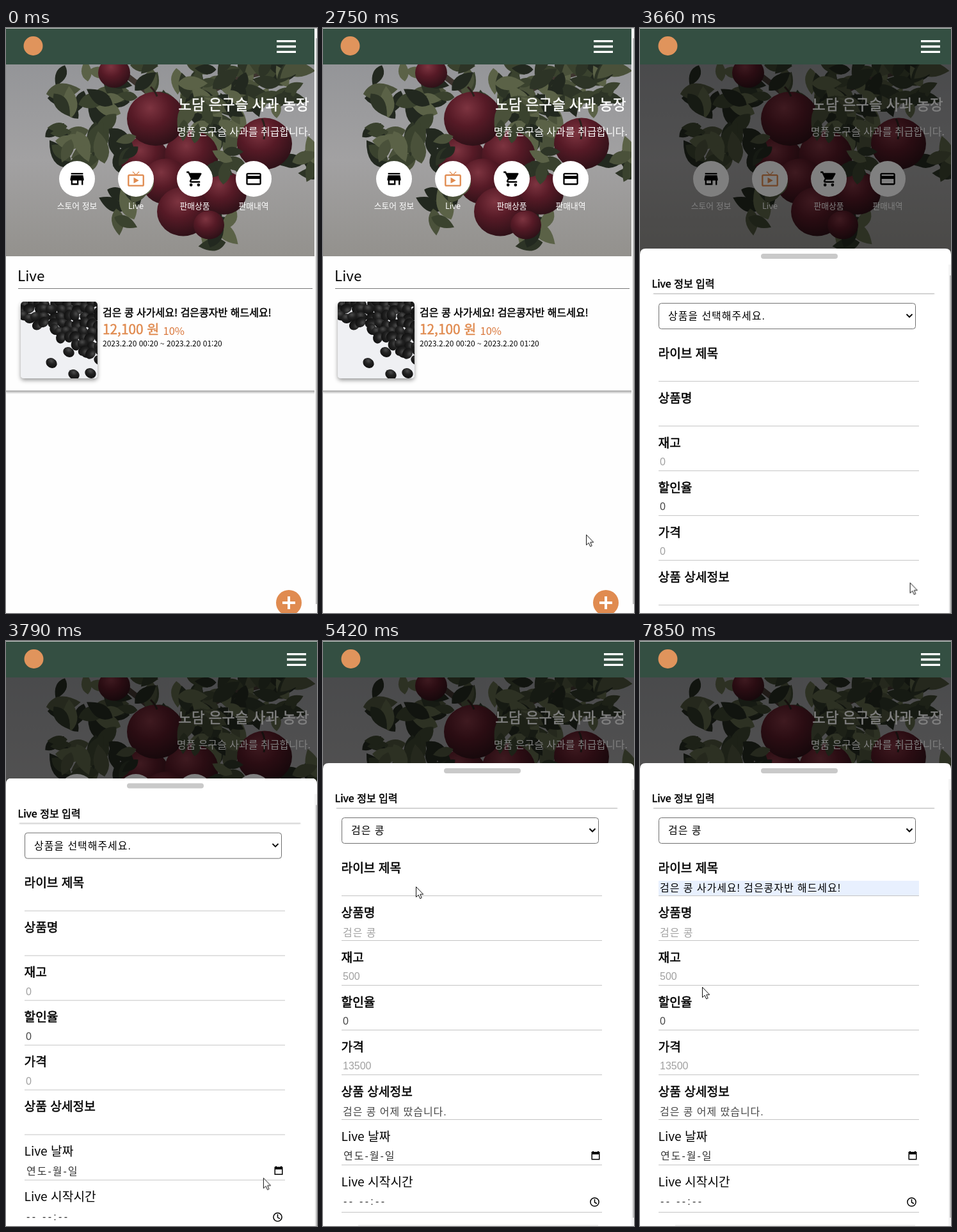
These frames come from a looping animation (486x915 px, 8000 ms). An HTML page:

```html
<!DOCTYPE html>
<html lang="ko">
<head>
<meta charset="utf-8">
<title>Live</title>
<style>
html, body { margin: 0; width: 100%; height: 100%; overflow: hidden; background: #fefefe; }
svg { display: block; width: 100vw; height: 100vh; }
text { font-family: "Noto Sans CJK KR", "Noto Sans KR", "Noto Sans", sans-serif; white-space: pre; }
.input { font: 16px "Liberation Sans", "Noto Sans CJK KR", sans-serif; letter-spacing: .95px; }
.num { font: 16px "Liberation Sans", sans-serif; }
.thin { font-weight: 300; fill: #333; }
/* a medium weight between regular and bold */
.medium { fill: currentColor; stroke: currentColor; stroke-width: .55px; stroke-linejoin: round; }
.label { font-size: 19.2px; }
.nav { font-size: 12.8px; fill: #fff; text-anchor: middle; }
.hint { fill: #a0a0a0; }

.anim { animation: 8s linear infinite; }
.step { animation: 8s step-end infinite; }
#scroll { animation-name: early; }
#menu { animation-name: menu; }
#logo { animation-name: logo; }
#fab { animation-name: fab; }
#dim { animation-name: dim; }
#sheet { animation-name: sheet; }
#cursor { animation-name: move; }
#arrow { animation-name: arrow; }
#list { animation-name: list; }
#popup { animation-name: popup; }
#preview { animation-name: preview; }
#tint { animation-name: tint; }
#title { animation-name: title; }
#focus { animation-name: focus; transform-origin: 233px 398px; }
.empty { animation-name: empty; }
.filled { animation-name: filled; }

@keyframes early { 0% { visibility: visible } 43.125%, 100% { visibility: hidden } }
@keyframes menu { 0% { transform: none } 43.125%, 100% { transform: translateX(16px) } }
@keyframes logo { 0% { transform: none } 43.125%, 100% { transform: translateX(1px) } }
@keyframes fab {
  0% { transform: translate(442px, 899px) }
  43.125%, 100% { transform: translate(459px, 916px) rotate(45deg) }
}
@keyframes dim { 0%, 43.125% { opacity: 0 } 44.25%, 100% { opacity: .5 } }
@keyframes sheet {
  0%, 44.375% { transform: translateY(726px); animation-timing-function: cubic-bezier(.16, 1, .3, 1) }
  50.625%, 100% { transform: none }
}
@keyframes arrow { 0% { visibility: hidden } 17.375%, 100% { visibility: visible } }
@keyframes list { 0% { visibility: hidden } 54.25% { visibility: visible } 63.5%, 100% { visibility: hidden } }
@keyframes empty { 0% { visibility: visible } 63.5%, 100% { visibility: hidden } }
@keyframes filled { 0% { visibility: hidden } 63.5%, 100% { visibility: visible } }
@keyframes popup { 0% { visibility: hidden } 71.25% { visibility: visible } 83.625%, 100% { visibility: hidden } }
@keyframes preview { 0% { visibility: hidden } 75% { visibility: visible } 83.625%, 100% { visibility: hidden } }
@keyframes tint { 0% { visibility: hidden } 75%, 100% { visibility: visible } }
@keyframes title { 0% { visibility: hidden } 83.625%, 100% { visibility: visible } }
@keyframes focus {
  0%, 71.25% { transform: scaleX(0) }
  75%, 86% { transform: none }
  89%, 100% { transform: scaleX(0) }
}
@keyframes move {
  0%, 20.75% { transform: translate(301px, 781px) }
  29.25%, 32.625% { transform: translate(153px, 438px) }
  33.5% { transform: translate(250px, 540px) }
  34.375% { transform: translate(411px, 792px) }
  42.375%, 44% { transform: translate(443px, 896px) }
  47.375% { transform: translate(402px, 841px) }
  51.75%, 54.25% { transform: translate(340px, 300px) }
  57.5% { transform: translate(127px, 348px) }
  59.375% { transform: translate(121px, 346px) }
  61.125%, 63.5% { transform: translate(121px, 360px) }
  67.75%, 71.25% { transform: translate(145px, 384px) }
  77% { transform: translate(215px, 415px) }
  77.875% { transform: translate(213px, 409px) }
  81.125%, 83.625% { transform: translate(205px, 405px) }
  93% { transform: translate(150px, 483px) }
  95.625% { transform: translate(118px, 562px) }
  97.375% { transform: translate(110px, 558px) }
  98.125%, 100% { transform: translate(97px, 541px) }
}
</style>
</head>
<body>
<svg viewBox="0 0 486 915" preserveAspectRatio="none">
  <defs>
    <linearGradient id="sky" x2="0" y2="1">
      <stop stop-color="#949598"/><stop offset=".5" stop-color="#a2a1a2"/><stop offset="1" stop-color="#93918d"/>
    </linearGradient>
    <radialGradient id="apple" cx=".4" cy=".3" r=".75">
      <stop stop-color="#7d3440"/><stop offset=".45" stop-color="#561a26"/><stop offset="1" stop-color="#2a1016"/>
    </radialGradient>
    <radialGradient id="bean" cx=".4" cy=".3" r=".8">
      <stop stop-color="#4c4c4c"/><stop offset=".4" stop-color="#222"/><stop offset="1" stop-color="#0c0c0c"/>
    </radialGradient>
    <clipPath id="heroClip"><path d="M0 57H486V357H0Z"/></clipPath>
    <clipPath id="thumbClip"><rect x="23" y="428" width="120" height="120" rx="5"/></clipPath>
    <filter id="soft" x="-20%" y="-20%" width="140%" height="160%"><feDropShadow dx="0" dy="3" stdDeviation="3" flood-opacity=".4"/></filter>
    <filter id="wide" x="-20%" y="-50%" width="140%" height="260%"><feDropShadow dx="0" dy="9" stdDeviation="11" flood-opacity=".28"/></filter>
    <filter id="small" x="-10%" y="-30%" width="120%" height="180%"><feDropShadow dx="0" dy="1" stdDeviation="1.5" flood-opacity=".35"/></filter>
    <filter id="line" filterUnits="userSpaceOnUse" x="0" y="560" width="486" height="20"><feDropShadow dx="0" dy="1" stdDeviation="1.5" flood-opacity=".4"/></filter>
  </defs>

  <path fill="#fefefe" d="M0 0H486V915H0Z"/>

  <!-- hero -->
  <g clip-path="url(#heroClip)">
    <path fill="url(#sky)" d="M0 57H486V357H0Z"/>
    <g id="photo"></g>
  </g>
  <text class="medium" x="473.5" y="128" font-size="22.4" color="#fff" text-anchor="end">노담 은구슬 사과 농장</text>
  <text x="476" y="168" font-size="16" fill="#fff" text-anchor="end">명품 은구슬 사과를 취급합니다.</text>
  <g id="nav"></g>

  <!-- live list -->
  <text x="18" y="396" font-size="22.4">Live</text>
  <path stroke="#777" d="M19 407.5H479"/>
  <path fill="#b5b5b5" d="M0 567H486V569H0Z" filter="url(#line)"/>
  <rect x="23" y="428" width="120" height="120" rx="5" fill="#eff0f3" filter="url(#soft)"/>
  <g id="beans" clip-path="url(#thumbClip)"></g>
  <text class="medium" x="151" y="451" font-size="16">검은 콩 사가세요! 검은콩자반 해드세요!</text>
  <text class="medium" x="151" y="479" font-size="20.8" color="#e08b50">12,100 원</text>
  <text x="245.5" y="480" font-size="16.5" fill="#d9763a">10%</text>
  <text x="151" y="498" font-size="12">2023.2.20 00:20 ~ 2023.2.20 01:20</text>

  <g id="fab" class="step">
    <circle r="20" fill="#e08b50"/>
    <path stroke="#fff" stroke-width="4" d="M-10 0H10M0 -10V10"/>
  </g>
  <path id="dim" class="anim" d="M0 57H486V915H0Z"/>

  <!-- header -->
  <path fill="#344f42" d="M0 0H486V57H0Z"/>
  <path fill="#c9cccb" d="M0 0H486V1H0Z"/>
  <circle id="logo" class="step" cx="42.5" cy="28" r="15" fill="#e0945c"/>
  <path id="menu" class="step" stroke="#fff" stroke-width="3.33" d="M423 20.67H453M423 29H453M423 37.33H453"/>
  <g id="scroll" class="step">
    <path fill="#fafafa" d="M482 1H486V915H482Z"/>
    <path fill="#bdbdbd" d="M484 16H486V901H484Z"/>
  </g>

  <!-- sheet -->
  <g id="sheet" class="anim">
    <path fill="#fff" d="M0 930V200Q0 191 9 191H477Q486 191 486 200V930Z"/>
    <rect x="189" y="199" width="120" height="8" rx="4" fill="#c9c9c9"/>
    <path fill="#f4f4f4" d="M482 216H486V930H482Z"/>
    <path fill="#c1c1c1" d="M484 233H486V902H484Z"/>
    <text class="medium" x="18.5" y="252" font-size="16">Live 정보 입력</text>
    <path fill="#c6c6c6" d="M21 261H460V262H21Z" filter="url(#small)"/>
    <path fill="#f0f0f0" d="M55 913H430V915H55Z"/>
    <rect x="29.5" y="276.5" width="401" height="40" rx="4" fill="#fff" stroke="#6f6f6f"/>
    <text class="input step empty" x="44" y="302">상품을 선택해주세요.</text>
    <text class="input step filled" x="44" y="302">검은 콩</text>
    <path fill="none" stroke="#000" stroke-width="2" d="M416.5 293.5L421 298L425.5 293.5"/>

    <path id="tint" class="step" fill="#e8f0fe" d="M29 375H436V398H29Z"/>
    <g id="rows"></g>
    <text id="preview" class="input step" x="31" y="389" style="font-size:13.33px;letter-spacing:.8px">검은 콩 사가세요! 검은콩자반 해드세요!</text>
    <text id="title" class="input step" x="31" y="392">검은 콩 사가세요! 검은콩자반 해드세요!</text>
    <path id="focus" class="anim" fill="#e0945c" d="M38 397H431V399H38Z"/>

    <text class="input step filled hint" x="31" y="461.5">검은 콩</text>
    <text class="num step empty hint" x="31" y="530">0</text>
    <text class="num step filled hint" x="31" y="530">500</text>
    <text class="num" x="31" y="600" fill="#444">0</text>
    <text class="num step empty hint" x="31" y="670">0</text>
    <text class="num step filled hint" x="31" y="670">13500</text>
    <text class="input step filled" x="31" y="742" fill="#444">검은 콩 어제 땄습니다.</text>
    <text class="input thin" x="32" y="811" style="letter-spacing:2px">연도-월-일</text>
    <text class="input thin" x="32" y="882" style="letter-spacing:3.3px">-- --:--</text>
    <path d="M421 798h2v1h6v-1h2v1h1.5v12.5h-13V799H421ZM421 803v7h10v-7Z" fill-rule="evenodd"/>
    <g fill="none" stroke="#000" stroke-width="1.5">
      <circle cx="424.5" cy="877.5" r="6.6"/><path d="M424.5 873V878L428 880"/>
    </g>

    <g id="list" class="step">
      <rect x="29.5" y="317.5" width="401" height="45" rx="5" fill="#fff" stroke="#b5b5b5" filter="url(#wide)"/>
      <path fill="#588df3" d="M30 340H430V357Q430 362 425 362H35Q30 362 30 357Z"/>
      <text class="input" x="44" y="335">상품을 선택해주세요.</text>
      <text class="input" x="44" y="357" fill="#fff">검은 콩</text>
    </g>
    <g id="popup" class="step">
      <path fill="#fff" d="M131 409H139L148.5 401L158 409H401Q405 409 405 413V450Q405 454 401 454H131Q127 454 127 450V413Q127 409 131 409Z" filter="url(#small)"/>
      <path fill="#e6e7e9" d="M127 413H405V449H127Z"/>
      <text class="input" x="140" y="436" style="font-size:13.2px;letter-spacing:.8px" fill="#222">검은 콩 사가세요! 검은콩자반 해드세요!</text>
    </g>
  </g>

  <g id="cursor" class="anim">
    <path id="arrow" class="step" fill="#fff" stroke="#111" d="M.5 .5V16.5L4.2 13.2L6.7 18.8L9.2 17.7L6.8 12.2H11.7Z"/>
  </g>
</svg>
<script>
const fill = (id, parts) => { document.getElementById(id).innerHTML = parts.join(''); };

function seeded(s) {
  return () => (s = (s * 16807) % 2147483647) / 2147483647;
}

// Apple branch: leaf clusters as [x, y, spread x, spread y, count]
const rnd = seeded(77);
const greens = ['#22281f', '#2d3426', '#3a422e', '#4a513a', '#5b6247'];
const leaf = (x, y) => {
  const size = .8 + rnd() * .6, turn = rnd() * 360;
  const color = greens[Math.floor(rnd() * greens.length)];
  return `<path fill="${color}" transform="translate(${x} ${y}) rotate(${turn}) scale(${size})" d="M-19 0Q-5 -19 20 0Q-4 17 -19 0"/>`;
};
const cluster = ([x, y, w, h, n]) => Array.from({ length: n }, () =>
  leaf(x + (rnd() - .5) * w, y + (rnd() - .5) * h)).join('');
const apple = ([x, y, r]) =>
  `<ellipse cx="${x}" cy="${y}" rx="${r}" ry="${r * .94}" fill="url(#apple)"/>`;

fill('photo', [
  '<path fill="none" stroke="#3e352f" stroke-width="9" d="M150 50Q220 90 270 150T320 260M270 130Q350 70 450 62"/>',
  ...[[140, 100, 110, 70, 24], [130, 185, 110, 70, 24], [270, 85, 120, 60, 26],
    [385, 90, 170, 70, 42], [330, 145, 70, 80, 22], [460, 210, 40, 60, 8],
    [185, 285, 50, 50, 8], [335, 315, 40, 50, 9]].map(cluster),
  ...[[169, 70, 25], [217, 206, 38], [290, 200, 42], [250, 240, 38], [340, 258, 36],
    [277, 287, 41], [317, 308, 24], [234, 142, 45], [404, 181, 43]].map(apple),
  ...[[305, 140, 60, 60, 10], [190, 185, 30, 40, 5], [345, 205, 40, 50, 7], [200, 245, 30, 30, 4]].map(cluster),
  '<path fill="none" stroke="#2b201c" stroke-width="3" d="M236 107Q234 100 226 92M403 174Q407 155 400 142"/>'
]);

// Beans pile up above a diagonal, a few lie loose below it
const bean = (x, y, turn) =>
  `<ellipse rx="9" ry="7.5" fill="url(#bean)" transform="translate(${x} ${y}) rotate(${turn})"/>`;
const beans = [[71, 524], [106, 542], [132, 540], [125, 508], [98, 507]].map(([x, y]) => bean(x, y, 30));
for (let y = 430; y < 520; y += 11) {
  for (let x = 26; x < 150; x += 12) {
    const px = x + (rnd() - .5) * 7, py = y + (rnd() - .5) * 6;
    if (py < 452 + (px - 23) * .55) beans.push(bean(px, py, rnd() * 180));
  }
}
fill('beans', beans);

const icons = [
  ['스토어 정보', 'M20 4H4v2h16V4zm1 10v-2l-1-5H4l-1 5v2h1v6h10v-6h4v6h2v-6h1zm-9 4H6v-4h6v4z'],
  ['Live', 'M21 6h-7.59l3.29-3.29L16 2l-4 4-4-4-.71.71L10.59 6H3c-1.1 0-2 .89-2 2v12c0 1.1.9 2 2 2h18c1.1 0 2-.9 2-2V8c0-1.11-.9-2-2-2zm0 14H3V8h18v12zM9 10v8l7-4z'],
  ['판매상품', 'M7 18a2 2 0 1 0 0 4a2 2 0 1 0 0-4zM1 2v2h2l3.6 7.59-1.35 2.45C4.5 15.4 5.5 17 7 17h12v-2H7.42c-.14 0-.25-.11-.25-.25l.93-1.75h7.45c.75 0 1.41-.41 1.75-1.03L20.88 5.48C21.2 4.8 20.7 4 20 4H5.21l-.94-2H1zm16 16a2 2 0 1 0 0 4a2 2 0 1 0 0-4z'],
  ['판매내역', 'M20 4H4c-1.11 0-2 .89-2 2v12c0 1.11.89 2 2 2h16c1.11 0 2-.89 2-2V6c0-1.11-.89-2-2-2zm0 14H4v-6h16v6zm0-10H4V6h16v2z']
];
fill('nav', icons.map(([name, d], i) => {
  const x = 111 + i * 92;
  return `<circle cx="${x}" cy="236" r="28" fill="#fff"/>
    <path fill="${i === 1 ? '#e08b50' : '#000'}" transform="translate(${x - 14} 222) scale(1.17)" d="${d}"/>
    <text class="nav" x="${x}" y="283">${name}</text>`;
}));

const labels = ['라이브 제목', '상품명', '재고', '할인율', '가격', '상품 상세정보', 'Live 날짜', 'Live 시작시간'];
fill('rows', labels.map((name, i) => {
  const line = 398.5 + i * 70 + (i > 5 ? 1 : 0) + (i > 6 ? 4 : 0);
  const weight = name.startsWith('Live') ? '' : 'medium';
  return `<text class="label ${weight}" x="28.5" y="${361.5 + i * 70 + (i > 6 ? 1 : 0)}">${name}</text>
    <path stroke="#c4c4c4" d="M29 ${line}H436"/>`;
}));
</script>
</body>
</html>
```
